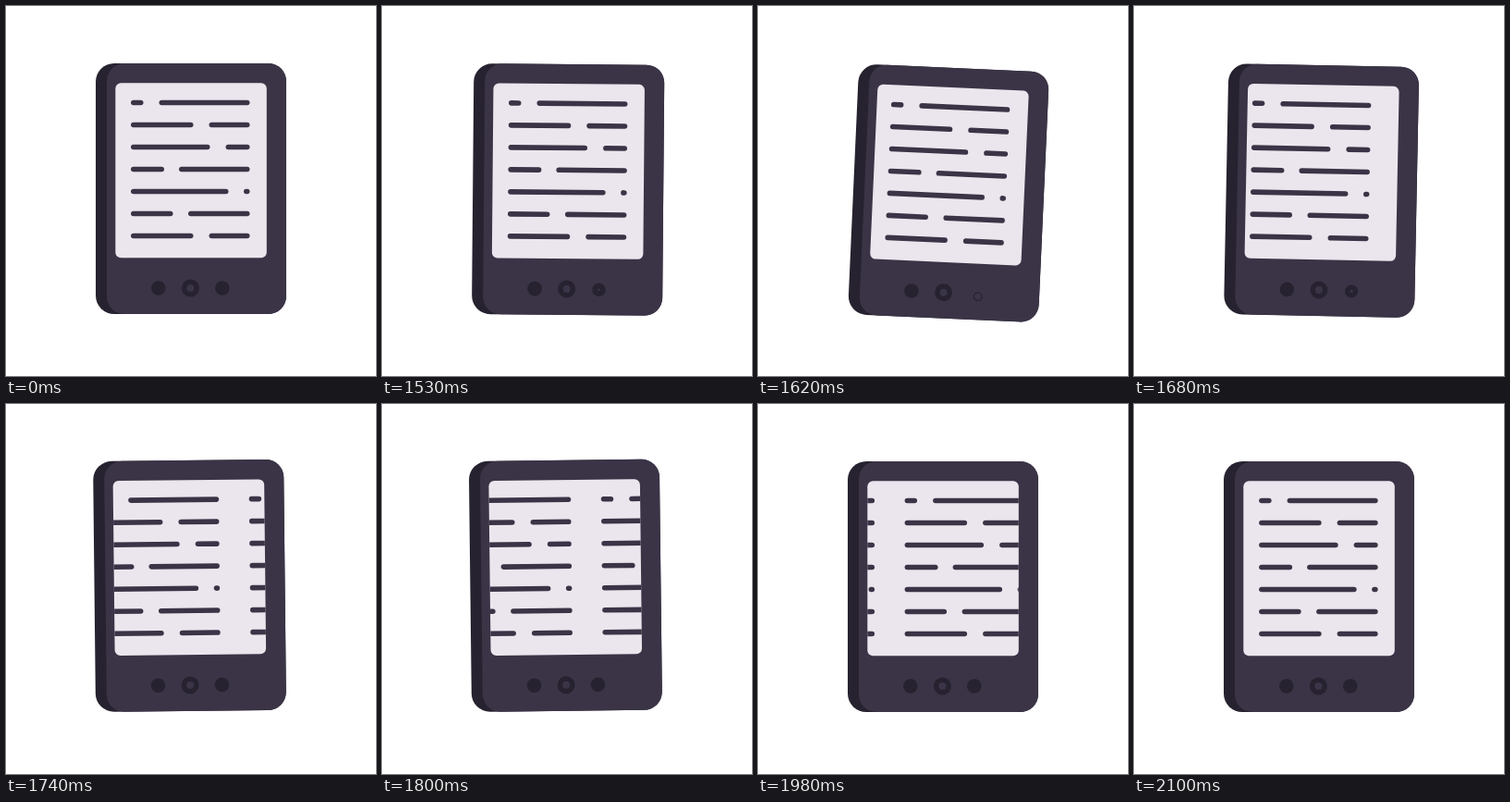
An HTML page with a canvas for the animation above (2190 ms loop, 400 by 400 pixels).

```html
<!DOCTYPE html>
<html>
<head>
<meta charset="utf-8">
<style>
html, body { margin: 0; width: 100%; height: 100%; overflow: hidden; background: #fff; }
canvas { display: block; width: 400px; height: 400px; }
</style>
</head>
<body>
<canvas id="stage"></canvas>
<script>
const LOOP = 2190, STEP = 30, PAGE = 161;
const BODY = '#3b3447', DARK = '#27222f', PAPER = '#ebe6ed';
const PIVOT = [97, 333];
// Left and right edges of the strokes in each text row
const ROWS = [
  [135, 148.5, 165.5, 263.5],
  [135, 202.5, 219.5, 263.5],
  [135, 220.5, 237.5, 263.5],
  [135, 171, 187, 263.5],
  [135, 240.5, 257, 263.5],
  [135, 180.5, 197, 263.5],
  [135, 202.5, 219.5, 263.5]
];

const canvas = document.getElementById('stage');
const ctx = canvas.getContext('2d');
const ratio = window.devicePixelRatio || 1;
canvas.width = canvas.height = 400 * ratio;

// Sine ease from 0 to 1 between times a and b
function ease(t, a, b) {
  const k = Math.min(1, Math.max(0, (t - a) / (b - a)));
  return 0.5 - 0.5 * Math.cos(Math.PI * k);
}

function box(x, y, w, h, r) {
  ctx.beginPath();
  ctx.moveTo(x + r, y);
  ctx.arcTo(x + w, y, x + w, y + h, r);
  ctx.arcTo(x + w, y + h, x, y + h, r);
  ctx.arcTo(x, y + h, x, y, r);
  ctx.arcTo(x, y, x + w, y, r);
  ctx.closePath();
}

function fillBox(x, y, w, h, r, color) {
  box(x, y, w, h, r);
  ctx.fillStyle = color;
  ctx.fill();
}

function disc(x, y, r, color) {
  ctx.beginPath();
  ctx.arc(x, y, r, 0, Math.PI * 2);
  ctx.fillStyle = color;
  ctx.fill();
}

function drawText(dx) {
  ROWS.forEach((row, i) => {
    for (let k = 0; k < 4; k += 2) {
      fillBox(row[k] + dx, 101.7 + 24 * i, row[k + 1] - row[k], 5.6, 2.8, BODY);
    }
  });
}

function drawButtons(press) {
  disc(164.8, 305, 7.8, DARK);
  disc(199.4, 305, 9.5, DARK);
  disc(199.4, 305, 4, BODY);
  const r = 7.8 - 3 * press, shift = 7.8 - r;
  disc(233.8 + shift, 305 + shift, r, DARK);
  if (press > 0) disc(233.8 + shift, 305 + shift, 3.7 * Math.pow(press, 0.6), BODY);
}

function draw(t) {
  const tilt = 2.65 * ease(t, 1500, 1605) - 3.55 * ease(t, 1605, 1770) + 0.9 * ease(t, 1770, 1860);
  const press = ease(t, 1500, 1608) - ease(t, 1608, 1716);
  const scroll = PAGE * ease(t, 1590, 2110);

  ctx.setTransform(ratio, 0, 0, ratio, 0, 0);
  ctx.fillStyle = '#fff';
  ctx.fillRect(0, 0, 400, 400);
  ctx.translate(PIVOT[0], PIVOT[1]);
  ctx.rotate(tilt * Math.PI / 180);
  ctx.translate(-PIVOT[0], -PIVOT[1]);

  fillBox(97, 62, 206, 271, 20, DARK);
  fillBox(109, 62, 194, 271, 19, BODY);
  drawButtons(press);

  fillBox(118.3, 83.3, 163.5, 189, 6, PAPER);
  ctx.save();
  box(118.3, 83.3, 163.5, 189, 6);
  ctx.clip();
  drawText(-scroll);
  drawText(PAGE - scroll);
  ctx.restore();
}

function tick() {
  const t = performance.now() % LOOP;
  draw(Math.floor(t / STEP) * STEP);
  requestAnimationFrame(tick);
}
tick();
</script>
</body>
</html>
```
